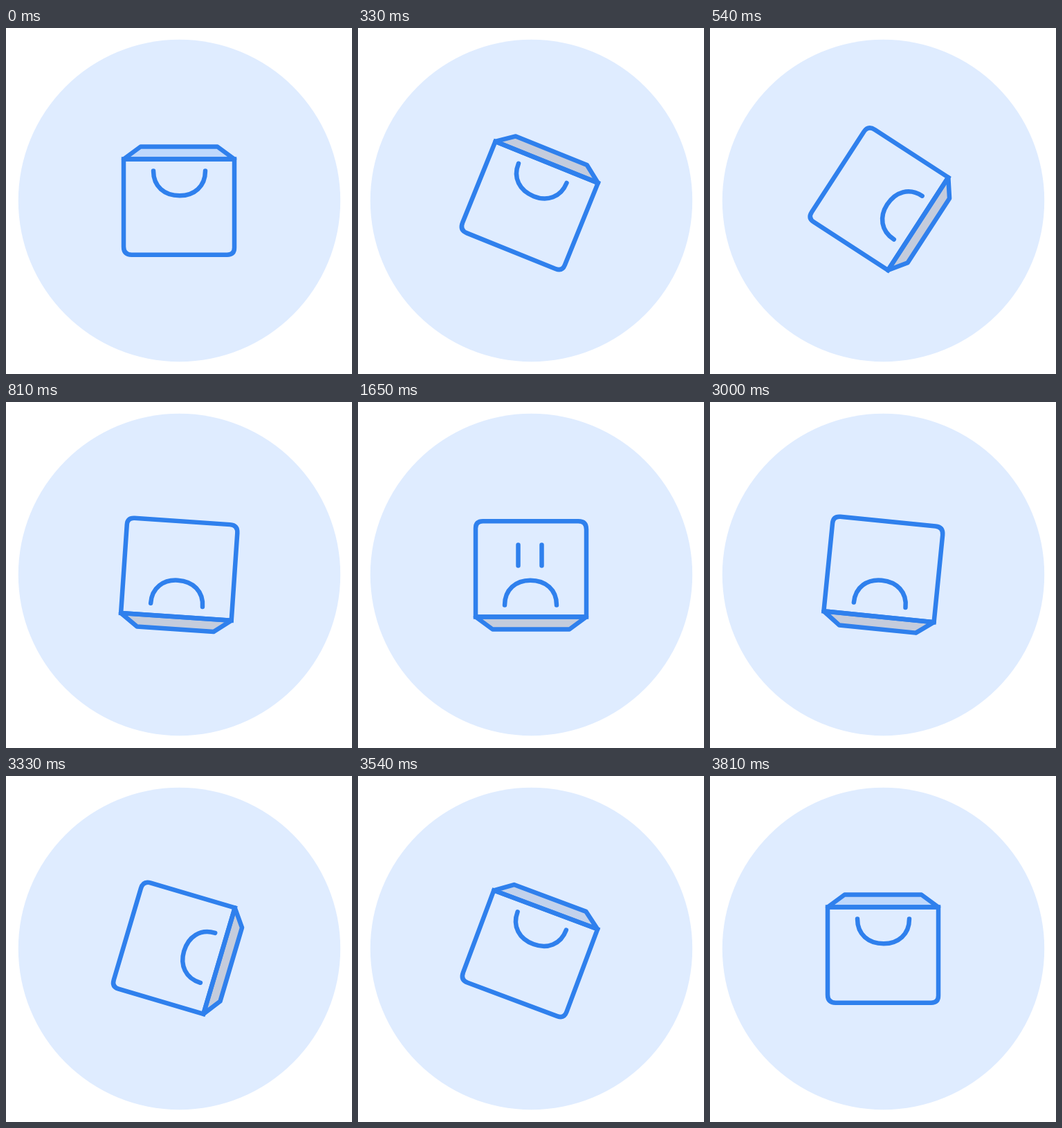
Recreate the animation shown at these times as an HTML page. Size 500 px wide and 500 px high, loop 4530 ms.

```html
<!DOCTYPE html>
<html lang="en">
<head>
<meta charset="utf-8">
<title>Bag</title>
<style>
  html, body { margin: 0; width: 100%; height: 100%; overflow: hidden; background: #fff; }
  svg { display: block; width: 100vw; height: 100vh; }
  .line { fill: none; stroke: #2f80ed; stroke-width: 6.5; }
  .round { stroke-linecap: round; stroke-linejoin: round; }
</style>
</head>
<body>
<svg viewBox="0 0 500 500">
  <circle cx="250.5" cy="249.5" r="232.7" fill="#dfecff"/>
  <g id="bag">
    <path id="flap" class="line round" d="M170 189.5L194.5 171.5H305.5L330 189.5Z"/>
    <path class="line" d="M170 189.5H330V317.5Q330 327.7 319.5 327.7H181.5Q170 327.7 170 316Z"/>
    <path class="line round" d="M213 206.5C213 229 229 242.2 251 242.2C272 242.2 288 229 288 206.5"/>
    <path id="eyes" class="line round"/>
  </g>
</svg>
<script>
const TICK = 30, LOOP = 4530;
const bag = document.getElementById('bag');
const flap = document.getElementById('flap');
const eyes = document.getElementById('eyes');

// [tick, degrees]: wind up, flip over, settle; then the way back
const turn = [
  [0, 0], [5, -12], [11, 22], [18, 123], [25, 186], [30, 180],
  [86, 180], [94, 198.5], [100, 185.7], [111, 106.5], [122, -5], [127, 0], [151, 0]
];

const clamp = x => Math.min(1, Math.max(0, x));
const ramp = (x, a, b) => {
  const u = clamp((x - a) / (b - a));
  return u * u * (3 - 2 * u);
};

// Tangent is flat at peaks and rests
function slope(keys, i) {
  const p = keys[i - 1], k = keys[i], n = keys[i + 1];
  if (!p || !n || (k[1] - p[1]) * (n[1] - k[1]) <= 0) return 0;
  return (n[1] - p[1]) / (n[0] - p[0]);
}

function spline(keys, x) {
  let i = 0;
  while (i < keys.length - 2 && x >= keys[i + 1][0]) i++;
  const [a, va] = keys[i], [b, vb] = keys[i + 1];
  const d = b - a, u = (x - a) / d, w = 1 - u;
  return va + (vb - va) * u * u * (3 - 2 * u)
    + d * u * w * (slope(keys, i) * w - slope(keys, i + 1) * u);
}

function mix(from, to, u) {
  return 'rgb(' + from.map((c, i) => Math.round(c + (to[i] - c) * u)) + ')';
}

function draw(ms) {
  const x = ms / TICK;
  bag.setAttribute('transform', `rotate(${spline(turn, x).toFixed(3)} 250 250)`);

  const shade = ramp(x, 0, 12) - ramp(x, 112, 124);
  flap.style.fill = mix([191, 216, 252], [196, 204, 220], shade);

  const open = ramp(x, 36, 55) - ramp(x, 86, 96);
  const half = 15 * open;
  eyes.style.display = open > 0.01 ? '' : 'none';
  eyes.setAttribute('d', [234.5, 268.5]
    .map(ex => `M${ex} ${278.5 - half}V${278.5 + half}`).join(''));
}

let start;
function loop(now) {
  if (start === undefined) start = now;
  draw(Math.max(0, now - start) % LOOP);
  requestAnimationFrame(loop);
}
draw(0);
requestAnimationFrame(loop);
</script>
</body>
</html>
```
